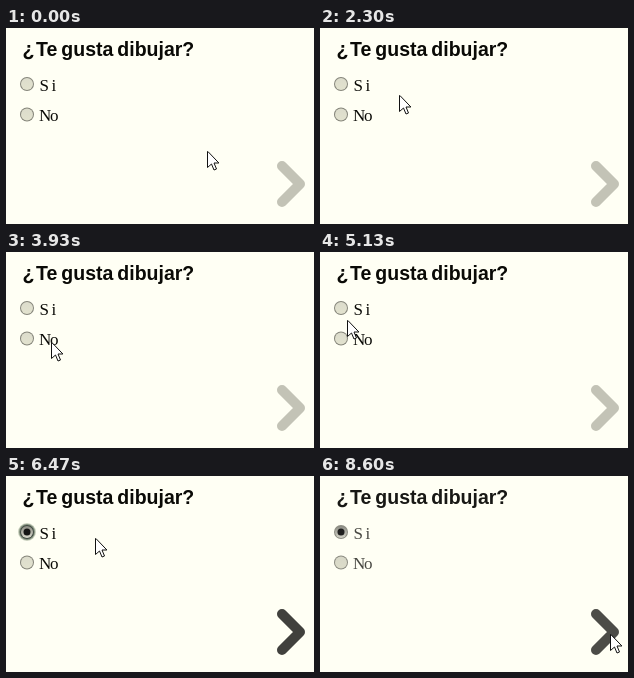
Animation, 308 px wide and 196 px high, one loop 8.63 s. Source, as an HTML page with a canvas:

```html
<!DOCTYPE html>
<html lang="es">
<head>
<meta charset="utf-8">
<title>¿Te gusta dibujar?</title>
<style>
  html, body { margin: 0; width: 100%; height: 100%; overflow: hidden; background: #fffff4; }
  canvas { display: block; }
</style>
</head>
<body>
<canvas width="308" height="196"></canvas>
<script>
const ctx = document.querySelector('canvas').getContext('2d');
const LOOP = 8630;
const PRESS = 5800, RELEASE = 6070, BLUR = 8400, FADE = 8570;
const PAPER = '#fffff4', INK = '#0a0a06';

// Hand strokes: each one bends from the last resting place past `via` to `to`.
const home = [201, 123];
const strokes = [
  { start: 970, end: 1530, via: [147, 79], to: [111, 72] },
  { start: 1870, end: 2530, via: [85, 66], to: [64, 66] },
  { start: 3100, end: 3930, via: [64, 74], to: [45, 90] },
  { start: 4700, end: 5530, via: [16, 55], to: [32, 73] },
  { start: 5600, end: 5930, via: [30, 64], to: [22, 58] },
  { start: 6070, end: 6930, via: [82, 42], to: [195, 113] },
  { start: 6970, end: 7570, via: [216, 161], to: [290, 168] },
  { start: 7730, end: 7930, via: [290, 162], to: [290, 158] }
];

function pointerAt(t) {
  let place = home;
  for (const { start, end, via, to } of strokes) {
    if (t < start) break;
    const k = Math.min(1, (t - start) / (end - start)), r = 1 - k;
    place = place.map((from, i) => r * r * from + 2 * r * k * via[i] + k * k * to[i]);
  }
  return place.map(Math.round);
}

function polyline(points) {
  ctx.beginPath();
  points.forEach(([x, y]) => ctx.lineTo(x, y));
}

function disc(x, y, r, fill) {
  ctx.beginPath();
  ctx.arc(x, y, r, 0, Math.PI * 2);
  ctx.fillStyle = fill;
  ctx.fill();
}

function radio(y, selected, focused) {
  const x = 21;
  if (focused) {
    disc(x, y, 9, '#cbd2bf');
    disc(x, y, 8, '#83907f');
  }
  const face = ctx.createLinearGradient(0, y - 6, 0, y + 6);
  face.addColorStop(0, selected ? '#8a8a82' : '#dcdccc');
  face.addColorStop(1, selected ? '#d8d8cc' : '#e2e2ce');
  disc(x, y, 7, focused ? '#414a42' : '#85857a');
  disc(x, y, 6, face);
  if (selected) disc(x, y, 3.5, '#151515');
}

function label(text, x, y, font, { letter = 0, word = 0 } = {}) {
  ctx.font = font;
  ctx.letterSpacing = letter + 'px';
  ctx.wordSpacing = word + 'px';
  ctx.fillStyle = INK;
  ctx.fillText(text, x, y);
}

function chevron(color) {
  polyline([[276, 138], [294, 156], [276, 174]]);
  ctx.lineWidth = 10;
  ctx.lineCap = ctx.lineJoin = 'round';
  ctx.strokeStyle = color;
  ctx.stroke();
}

function pointer(x, y) {
  ctx.save();
  ctx.translate(x + 0.5, y + 0.5);
  polyline([[0, 0], [0, 16], [4, 12.5], [6.5, 18.5], [9, 17.5], [6.5, 11.5], [11, 11.5]]);
  ctx.closePath();
  ctx.fillStyle = '#fff';
  ctx.fill();
  ctx.lineWidth = 1;
  ctx.lineJoin = 'miter';
  ctx.strokeStyle = '#111';
  ctx.stroke();
  ctx.restore();
}

function draw(t) {
  const selected = t >= RELEASE;
  const fading = t >= FADE;
  ctx.globalAlpha = 1;
  ctx.fillStyle = PAPER;
  ctx.fillRect(0, 0, 308, 196);

  const bold = 'bold 19.5px "Liberation Sans", Arial, sans-serif';
  const serif = '17px "Liberation Serif", serif';
  ctx.globalAlpha = fading ? 0.94 : 1;
  label('¿', 16.5, 28, bold);
  label('Te gusta dibujar?', 30, 28, bold, { word: -1.4 });
  chevron(selected ? '#41413d' : '#c3c3b6');
  radio(56, selected, t >= PRESS && t < BLUR);
  radio(86.5, false, false);

  ctx.globalAlpha = fading ? 0.75 : 1;
  label('Si', 33.5, 63, serif, { letter: 2.5 });
  label('No', 33, 93, serif, { letter: -1.2 });

  ctx.globalAlpha = 1;
  pointer(...pointerAt(t));
}

function frame() {
  draw(performance.now() % LOOP);
  requestAnimationFrame(frame);
}
frame();
</script>
</body>
</html>
```
